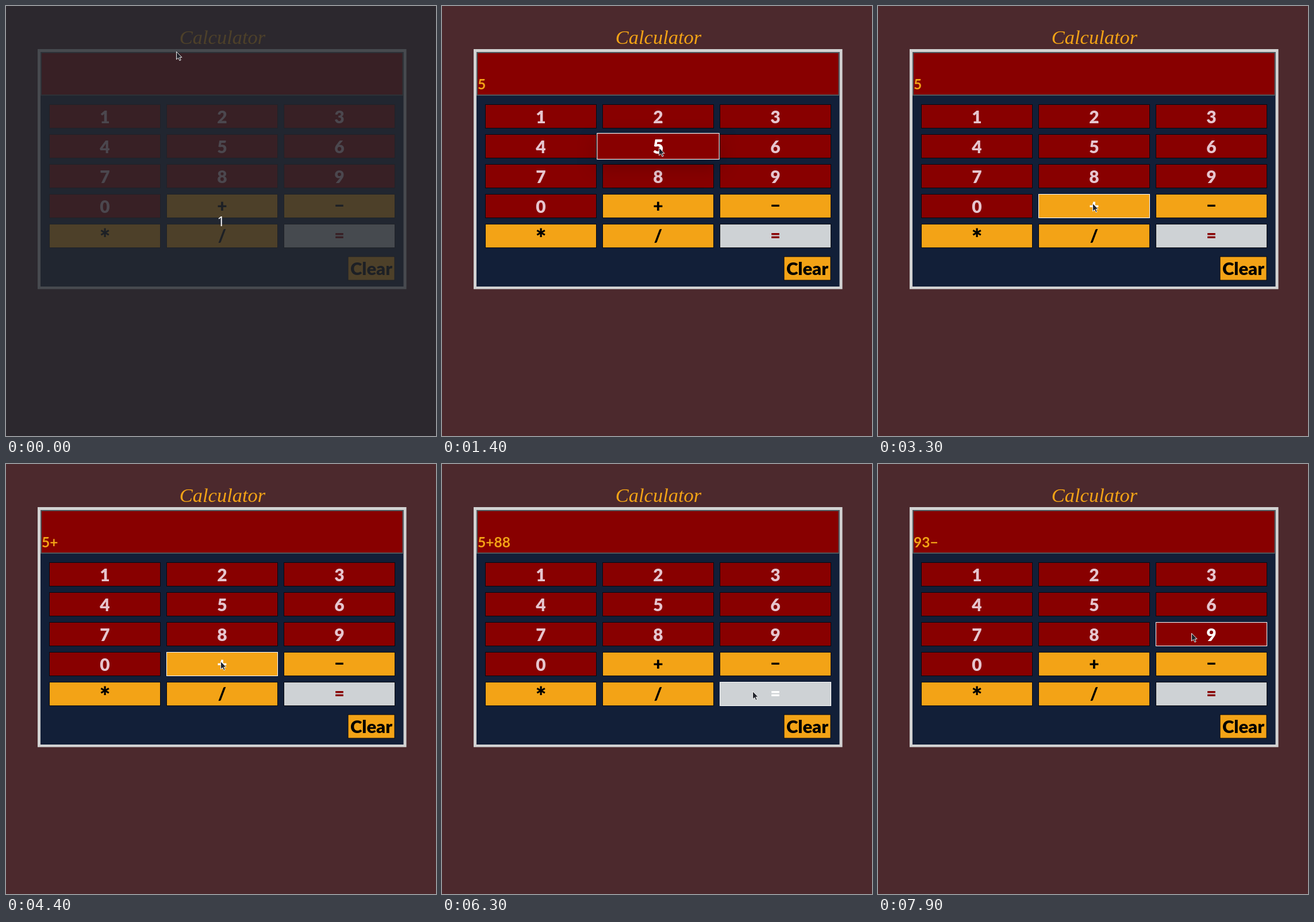
An HTML page that plays this animation: 748x748 px, repeating every 8000 ms.

```html
<!DOCTYPE html>
<html lang="en">
<head>
<meta charset="utf-8">
<title>Calculator</title>
<style>
  html, body { margin: 0; width: 100%; height: 100%; overflow: hidden; background: #4c292d; }
  svg { display: block; width: 100vw; height: 100vh; }
  text { font-family: Lato, sans-serif; }
  .title { font: italic 34.5px "Liberation Serif", serif; fill: #f3a316; text-anchor: middle; }
  .screen { font-size: 24.5px; font-weight: 700; fill: #f3a316; }
  .key rect { stroke: #08090f; }
  .key text { font-size: 30px; font-weight: 900; text-anchor: middle; }
  .digit rect { fill: #880000; }
  .digit text { fill: #e6c5ce; }
  .op rect { fill: #f3a316; }
  .equals rect { fill: #ced2d5; }
  .equals text { fill: #880000; }
  .hover rect { stroke: #fff; }
  .hover text { fill: #fff; }
  .press { filter: drop-shadow(0 12px 16px rgba(0, 0, 0, .2)); }
  .count { font: 24px "Open Sans", sans-serif; fill: #fff; text-anchor: middle; }
</style>
</head>
<body>
<svg viewBox="0 0 748 748">
  <rect width="748" height="748" fill="#4c292d"/>
  <text class="title" x="376.5" y="66">Calculator</text>
  <rect x="55" y="75" width="641.5" height="417.5" fill="#d2d2d2"/>
  <rect x="60" y="80" width="631.5" height="408" fill="#121f38"/>
  <rect x="61" y="81" width="629.5" height="74" fill="#880000" stroke="#50575c" stroke-width="2"/>
  <text class="screen" id="screen" x="62" y="145"></text>
  <g id="keys"></g>
  <g id="veil">
    <rect width="748" height="748" fill="#25292f" opacity=".8"/>
    <text class="count" x="374" y="383">1</text>
  </g>
  <path id="cursor" d="M.5 .5V14L3.7 11.2L6 16L8.2 15L6 10.3H10Z" fill="#20222a" stroke="#eee" stroke-width="1"/>
</svg>
<script>
const LOOP = 8000, STEP = 100;
const $ = id => document.getElementById(id);
const keys = {};

function make(tag, attrs, parent) {
  const el = document.createElementNS('http://www.w3.org/2000/svg', tag);
  for (const name in attrs) el.setAttribute(name, attrs[name]);
  return parent.appendChild(el);
}

function addKey(label, kind, x, y, w, h, baseline, size) {
  const cx = x + w / 2, cy = y + h / 2;
  const g = make('g', { class: 'key ' + kind }, $('keys'));
  make('rect', { x: x + .5, y: y + .5, width: w - 1, height: h - 1 }, g);
  const text = make('text', { x: cx, y: y + baseline }, g);
  text.textContent = label;
  if (size) text.style.fontSize = size + 'px';
  keys[label] = { g, kind, cx, cy };
}

[...'1234567890+−*/='].forEach((label, i) => {
  const kind = i < 10 ? 'digit' : label === '=' ? 'equals' : 'op';
  const star = label === '*';
  const baseline = star ? 41 : label === '/' ? 32 : i < 10 ? 32.5 : 31;
  addKey(label, kind, 75 + i % 3 * 204, 171 + Math.floor(i / 3) * 52, 194, 42, baseline, star && 44);
});
addKey('Clear', 'op', 594.5, 435.5, 82, 42, 32, 31);

// Pointer moves: first step, last step, end x, end y
const moves = [
  [0, 0, 296, 79], [100, 100, 346, 91], [200, 900, 380, 234], [1100, 1100, 377, 246],
  [1700, 2000, 370, 340], [2400, 2500, 364, 292], [2900, 3000, 369, 328],
  [3200, 3200, 367, 318], [3300, 3300, 373, 343], [4800, 4900, 351, 285],
  [5800, 5900, 418, 342], [6100, 6300, 540, 395], [7000, 7000, 461, 328],
  [7200, 7200, 478, 316], [7300, 7400, 540, 345], [7700, 7900, 545, 294]
];
const hovers = [
  ['5', 800, 1700], ['8', 1800, 1900], ['+', 2000, 2400], ['8', 2500, 2900],
  ['+', 3000, 4800], ['8', 4900, 5800], ['=', 6300, 7000], ['−', 7300, 7800], ['9', 7900, LOOP]
];
const presses = [
  ['5', 1400, 1500], ['8', 5100, 5200], ['8', 5500, 5600], ['=', 6500, 6600], ['−', 7600, 7700]
];
const shown = [
  [0, ''], [1400, '5'], [4400, '5+'], [5100, '5+8'], [5500, '5+88'], [6500, '93'], [7600, '93−']
];

const active = (spans, t) => (spans.find(([, from, to]) => t >= from && t < to) || [])[0];

function pointer(t) {
  let x = 0, y = 0;
  for (const [from, to, endX, endY] of moves) {
    if (t < from) break;
    const p = Math.min(1, (t - from + STEP) / (to - from + STEP));
    x += (endX - x) * p;
    y += (endY - y) * p;
  }
  return [x, y];
}

function draw(time) {
  const t = Math.floor(time % LOOP / STEP) * STEP;
  const hover = active(hovers, t), press = active(presses, t);
  for (const label in keys) {
    const { g, kind, cx, cy } = keys[label];
    const down = label === press;
    g.setAttribute('class', `key ${kind}${label === hover ? ' hover' : ''}${down ? ' press' : ''}`);
    g.setAttribute('transform', down ? `translate(${cx} ${cy}) scale(1.1) translate(${-cx} ${-cy})` : '');
    if (down && g.nextSibling) g.parentNode.appendChild(g);
  }
  $('screen').textContent = shown.filter(([from]) => t >= from).pop()[1];
  $('veil').style.display = t < 100 ? '' : 'none';
  $('cursor').setAttribute('transform', `translate(${pointer(t)})`);
}

const start = performance.now();
function tick() {
  draw(performance.now() - start);
  requestAnimationFrame(tick);
}
tick();
</script>
</body>
</html>
```
